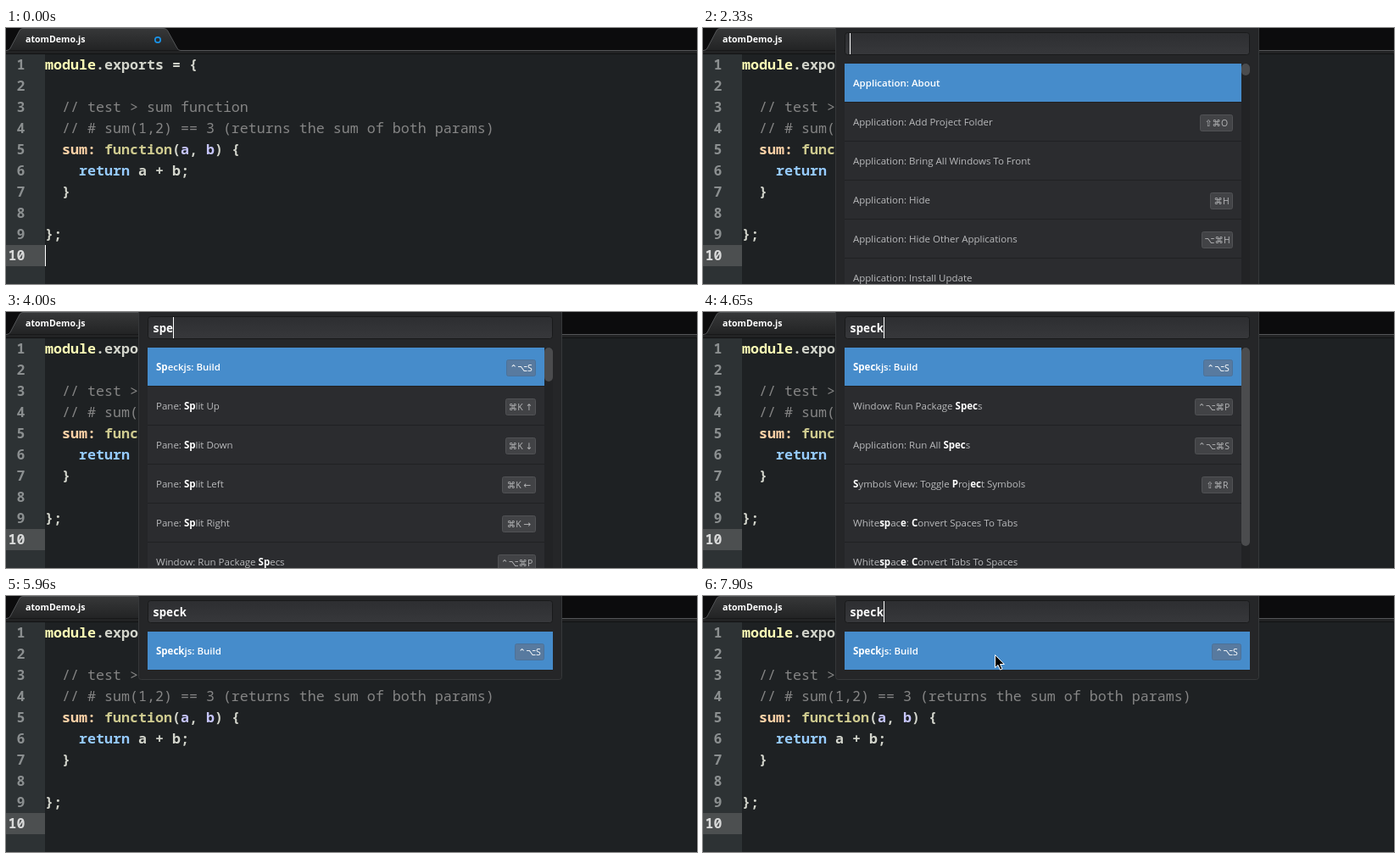
An HTML page that plays this animation: 815x302 px, repeating every 8000 ms.

```html
<!DOCTYPE html>
<html>
<head>
<meta charset="utf-8">
<style>
  html, body { margin: 0; width: 100%; height: 100%; overflow: hidden; background: #1e2123; }
  svg { display: block; }
  text { white-space: pre; }
  .code { font: 600 16.67px 'Noto Sans Mono', monospace; }
  .query { font: 600 13.33px 'Noto Sans Mono', monospace; fill: #fff; }
  .item { font: 500 11.5px 'Open Sans', sans-serif; fill: #b9babc; }
  .item tspan { font-weight: 700; fill: #fff; }
  .item.on { font-weight: 600; fill: #fff; }
  .key { font: 500 10.5px 'Open Sans', 'DejaVu Sans', sans-serif; fill: #b5b6b8; text-anchor: middle; }
  .title { font: 700 10.6px 'Open Sans', sans-serif; fill: #fff; }
</style>
</head>
<body>
<svg width="815" height="302" viewBox="0 0 815 302">
  <defs>
    <linearGradient id="tab" x2="0" y2="1">
      <stop offset="0" stop-color="#373839"/><stop offset="1" stop-color="#222324"/>
    </linearGradient>
    <linearGradient id="field" x2="0" y2="1">
      <stop offset="0" stop-color="#2d2e31"/><stop offset="1" stop-color="#37383b"/>
    </linearGradient>
  </defs>
  <rect width="815" height="27" fill="#0c0c0d"/>
  <rect y="27" width="815" height="3" fill="#222324"/>
  <rect y="30" width="815" height="1" fill="#111213"/>
  <path d="M-1 26.5H1Q4 26 5 24L16 3Q17 .5 20 .5H186Q189 .5 190.5 3L202 24Q203 26.5 206 26.5H816" fill="url(#tab)" stroke="#535557"/>
  <text class="title" x="23" y="17">atomDemo.js</text>
  <circle cx="179" cy="14" r="3.2" fill="none" stroke="#1a92e6" stroke-width="1.7"/>
  <rect y="31" width="46" height="271" fill="#2d3234"/>
  <rect y="256" width="46" height="25" fill="#4c4f50"/>
  <g id="code" class="code"></g>
  <path d="M814.5 31V302" stroke="#151718"/>
  <g id="palette"></g>
  <rect id="caret" width="1" height="25" fill="#fff"/>
  <path id="mouse" d="M0 0V15L3.5 12L6 17.5L8.5 16.5L6 11H10.8Z" fill="#000" stroke="#fff"/>
</svg>
<script>
const $ = id => document.getElementById(id);
const plain = '#d3d5cc', gray = '#858585', lilac = '#c6c5fe';

// Each line: indent, then text and colour in turn
const lines = [
  [0, 'module', '#ffffb6', '.exports = {', plain],
  [0],
  [2, '// test > sum function', gray],
  [2, '// # sum(1,2) == 3 (returns the sum of both params)', gray],
  [2, 'sum:', '#ffd2a7', ' function', '#cfcb90', '(', plain, 'a', lilac, ', ', plain, 'b', lilac, ') {', plain],
  [4, 'return', '#96cbfe', ' a + b;', plain],
  [2, '}', plain],
  [0],
  [0, '};', plain],
  [0]
];
$('code').innerHTML = lines.map(([indent, ...parts], i) => {
  const y = 48.5 + 25 * i;
  let spans = '';
  for (let k = 0; k < parts.length; k += 2)
    spans += `<tspan fill="${parts[k + 1]}">${parts[k].replace('>', '&gt;')}</tspan>`;
  return `<text x="22.5" y="${y}" text-anchor="end" fill="${i == 9 ? '#d8d9d9' : '#8b8f90'}">${i + 1}</text>` +
    `<text x="${46 + 10 * indent}" y="${y}" font-weight="${parts[1] == gray ? 500 : 600}">${spans}</text>`;
}).join('');

// Result lists: start time, scroll thumb height, rows as "label|keys|key width"; * marks matches
const build = s => s + ': Build|⌃⌥S|35';
const lists = [
  [2330, 14, ['Application: About', 'Application: Add Project Folder|⇧⌘O|39',
    'Application: Bring All Windows To Front', 'Application: Hide|⌘H|27',
    'Application: Hide Other Applications|⌥⌘H|37', 'Application: Install Update']],
  [3350, 14, [build('*S*peckjs'), '*S*nippets: Expand', '*S*nippets: Available|⌥⇧S|37',
    '*S*tyleguide: Show|⌃⇧⌘G|47', '*S*pell Check: Toggle|⇧⌘:|37', '*S*ettings View: Open|⌘,|27']],
  [3650, 40, [build('*Sp*eckjs'), 'Pane: *Sp*lit Up|⌘K ↑|36', 'Pane: *Sp*lit Down|⌘K ↓|36',
    'Pane: *Sp*lit Left|⌘K ←|40', 'Pane: *Sp*lit Right|⌘K →|40', 'Window: Run Package *Sp*ecs|⌃⌥⌘P|45']],
  [4060, 110, [build('*Spe*ckjs'), 'Window: Run Package *Spe*cs|⌃⌥⌘P|45',
    'Application: Run All *Spe*cs|⌃⌥⌘S|45', '*S*ymbols View: Toggle *P*roj*e*ct Symbols|⇧⌘R|37',
    'White*sp*ac*e*: Convert Spaces To Tabs', 'White*sp*ac*e*: Convert Tabs To Spaces']],
  [4410, 234, [build('*Spec*kjs'), 'Window: Run Package *Spec*s|⌃⌥⌘P|45',
    'Application: Run All *Spec*s|⌃⌥⌘S|45', '*S*ymbols View: Toggle *P*roj*ec*t Symbols|⇧⌘R|37',
    'White*sp*ac*e*: *C*onvert Spaces To Tabs', 'White*sp*ac*e*: *C*onvert Tabs To Spaces']],
  [4700, 0, [build('*Speck*js')]]
];
const typed = [3230, 3590, 4000, 4350, 4650];
const blinks = [360, 780, 1200, 1560, 1970, 2330, 2570, 2990, 5180, 5540, 5960, 6370, 6730, 7130, 7550, 7900];
const count = (times, t) => times.filter(s => s <= t).length;

function row(item, i, right) {
  const [label, keys, width] = item.split('|');
  const top = 42 + 46 * i, sel = i == 0;
  let s = `<rect x="167" y="${top}" width="${right - 167}" height="45" fill="${sel ? '#468ccb' : '#2b2c2f'}"/>` +
    `<rect x="167" y="${top + 45}" width="${right - 167}" height="1" fill="#202123"/>` +
    `<text class="item ${sel ? 'on' : ''}" x="177" y="${top + 27}">${label.replace(/\*(.+?)\*/g, '<tspan>$1</tspan>')}</text>`;
  if (keys) s += `<rect x="${right - 9.5 - width}" y="${top + 14.5}" width="${width - 1}" height="19" rx="2" ` +
    `fill="${sel ? '#587a9f' : '#424346'}" stroke="${sel ? '#4c7299' : '#515255'}"/>` +
    `<text class="key" x="${right - 10 - width / 2}" y="${top + 28}" ${sel ? 'style="fill:#fff"' : ''}>${keys}</text>`;
  return s;
}

function palette(list, n) {
  if (!list) return '';
  const [, thumb, rows] = list, right = thumb ? 635 : 645;
  return `<rect x="156.5" y="-6.5" width="499" height="${thumb ? 320 : 105}" rx="3" fill="#252628" stroke="#36383a"/>` +
    `<rect x="167.5" y="5.5" width="477" height="26" rx="3" fill="url(#field)" stroke="#191a1b"/>` +
    `<text class="query" x="173" y="24">${'speck'.slice(0, n)}</text>` +
    rows.map((r, i) => row(r, i, right)).join('') +
    (thumb ? `<rect x="635" y="42" width="10" height="260" fill="#222325"/>` +
      `<rect x="635" y="42" width="10" height="${thumb}" rx="5" fill="#4b4c4e"/>` : '');
}

let shown;
function draw(now) {
  const t = now % 8000;
  const n = count(typed, t), li = count(lists.map(l => l[0]), t);
  if (shown != n + ',' + li) {
    shown = n + ',' + li;
    $('palette').innerHTML = palette(lists[li - 1], n);
  }
  $('caret').setAttribute('x', li ? 173 + 8 * n : 46);
  $('caret').setAttribute('y', li ? 6 : 256);
  $('caret').style.opacity = count(blinks, t) % 2 ? 0 : 1;

  // Pointer glides up in 17 steps, slowing down
  const p = Math.min(1, Math.floor((t - 6730) / 58.8) / 17), rest = (1 - p) ** 2;
  $('mouse').style.display = t < 6730 ? 'none' : '';
  $('mouse').setAttribute('transform', `translate(${344.5 + 3 * rest} ${69.5 + 191 * rest})`);
  requestAnimationFrame(draw);
}
draw(0);
</script>
</body>
</html>
```
